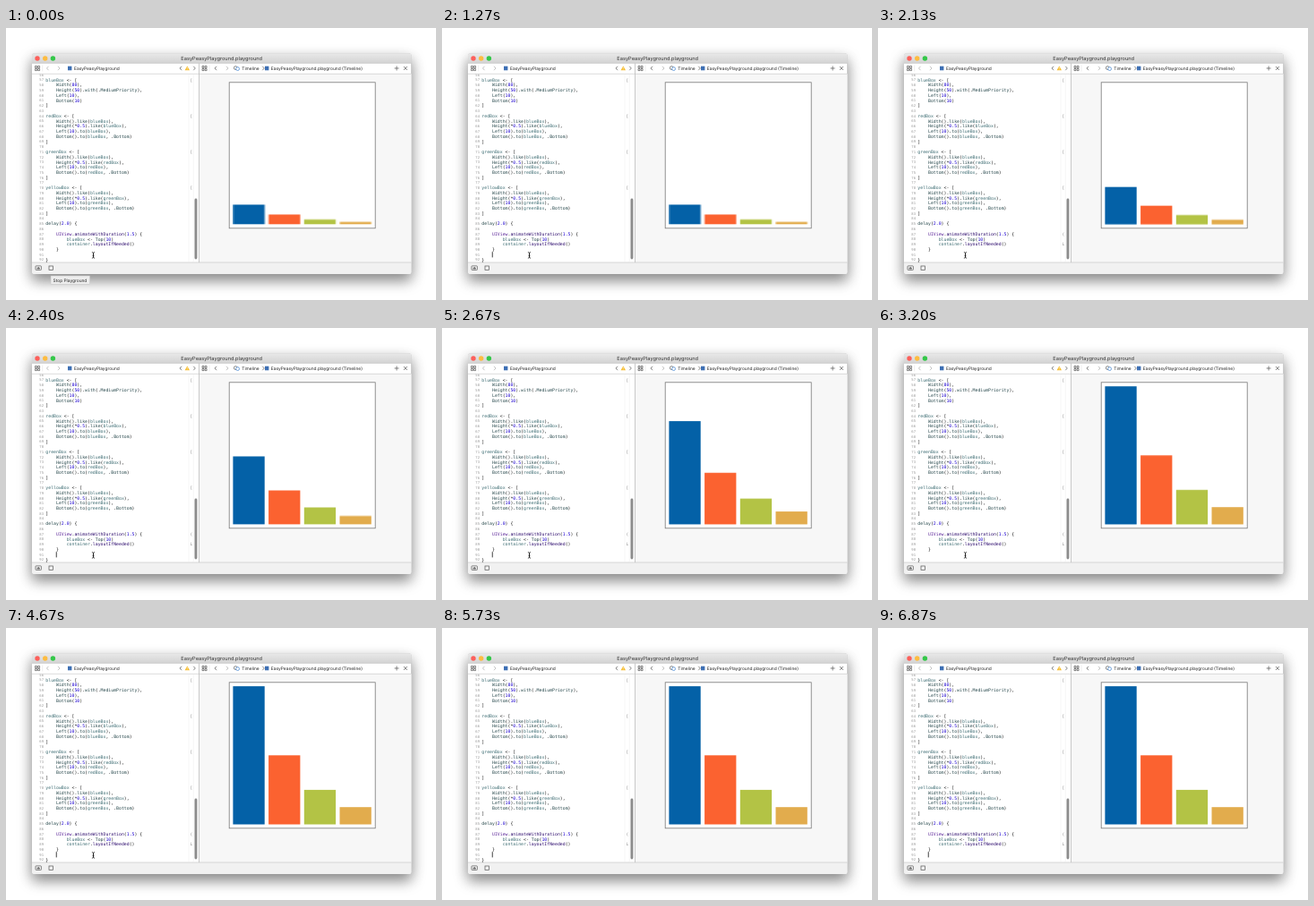
These frames come from a looping animation (480 by 304 pixels, 6940 ms). An HTML page:

```html
<!DOCTYPE html>
<html lang="en">
<head>
<meta charset="utf-8">
<title>Playground</title>
<style>
html, body { margin: 0; width: 100%; height: 100%; overflow: hidden; background: #fff; }
svg { display: block; width: 480px; height: 304px; }
text { font-family: Inter, "Open Sans", sans-serif; font-size: 4.85px; fill: #222; text-rendering: geometricPrecision; white-space: pre; }
.title { font-size: 5.65px; fill: #333; text-anchor: middle; }
.code text, .marks text { font-family: "DejaVu Sans Mono", monospace; fill: #111; }
.code .line { font-size: 3.9px; fill: #999; text-anchor: end; }
.code .num { fill: #1c00cf; }
.code .name { fill: #3f6e74; }
.code .call { fill: #26474b; }
.code .type { fill: #5c2699; }
.code .sys { fill: #2e0d6e; }
.marks text { fill: #888; font-size: 4.6px; }
.shadow { filter: drop-shadow(0 7px 8px rgba(0, 0, 0, .36)) drop-shadow(0 0 .6px rgba(0, 0, 0, .5)); }
.icon { fill: none; stroke: #555; stroke-width: .7; }
.dim { stroke: #aaa; }

.caret, .late, .tip, .bars, .mouse, .beam, .arrow { animation: 6940ms infinite; }
.caret { animation-name: blink; animation-timing-function: step-end; }
.late { animation-name: appear; animation-timing-function: step-end; }
.tip { animation-name: fade; animation-timing-function: linear; }
.bars { animation-name: grow; transform-origin: 0 219.5px; }
.mouse { animation-name: leave; }
.beam { animation-name: beam; animation-timing-function: step-end; }
.arrow { animation-name: arrow; animation-timing-function: step-end; }

@keyframes blink {
  0%, 10.37%, 25.79%, 42.15%, 58.43%, 74.78%, 91.14% { opacity: 0; }
  2.74%, 18.16%, 33.5%, 50.72%, 67.15%, 82.42%, 98.85%, 100% { opacity: 1; }
}
@keyframes appear { 0% { opacity: 0; } 24.86%, 100% { opacity: 1; } }
@keyframes fade { 0% { opacity: 1; } 2.85%, 100% { opacity: 0; } }
@keyframes grow {
  0%, 24.94% { transform: scaleY(.1428); animation-timing-function: cubic-bezier(.42, 0, .58, 1); }
  46.56%, 100% { transform: scaleY(1); }
}
@keyframes leave {
  0%, 70.5% { transform: none; animation-timing-function: ease-in; }
  76.73%, 100% { transform: translate(4px, 34px); }
}
@keyframes beam { 0% { opacity: 1; } 73.4%, 100% { opacity: 0; } }
@keyframes arrow { 0% { opacity: 0; } 73.4% { opacity: 1; } 76.73%, 100% { opacity: 0; } }
</style>
</head>
<body>
<svg viewBox="0 0 480 304">
  <defs>
    <linearGradient id="bar" x2="0" y2="1">
      <stop stop-color="#e9e9e9"/><stop offset="1" stop-color="#d3d3d3"/>
    </linearGradient>
    <clipPath id="frame"><rect x="29" y="28.5" width="423.5" height="246.5" rx="2.5"/></clipPath>
    <clipPath id="editor"><rect x="29" y="51.5" width="186" height="210.5"/></clipPath>
    <g id="grid" class="icon"><path d="M-2.5-2.5h2v2h-2zM.6-2.5h2v2h-2zM-2.5.6h2v2h-2zM.6.6h2v2h-2z"/></g>
    <path id="prev" d="M1-2.2L-1 0L1 2.2"/>
    <path id="next" d="M-1-2.2L1 0L-1 2.2"/>
  </defs>

  <rect class="shadow" x="29" y="28.5" width="423.5" height="246.5" rx="2.5" fill="#fff"/>
  <g clip-path="url(#frame)">
    <rect x="29" y="28" width="424" height="11.5" fill="url(#bar)"/>
    <rect x="216" y="51" width="237" height="211" fill="#f7f7f7"/>
    <rect x="29" y="262" width="424" height="13" fill="#f1f1f1"/>
    <path d="M29 39.3H453M29 51.3H453M29 262H453" stroke="#c2c2c2" stroke-width=".6"/>
    <path d="M215.5 39.5V262" stroke="#bbb" stroke-width=".8"/>
    <path d="M204 51.5V262M209.3 51.5V262" stroke="#ededed" stroke-width=".5"/>
  </g>

  <circle cx="35" cy="34" r="2.7" fill="#fc605b"/>
  <circle cx="43.7" cy="34" r="2.7" fill="#fdbc40"/>
  <circle cx="52.4" cy="34" r="2.7" fill="#34c749"/>
  <text class="title" x="240.7" y="36.1">EasyPeasyPlayground.playground</text>

  <use href="#grid" x="35" y="45"/>
  <path d="M40.7 41.5v7M227 41.5v7" stroke="#ddd" stroke-width=".5"/>
  <g class="icon dim">
    <use href="#prev" x="46.5" y="45"/><use href="#next" x="59" y="45"/>
    <use href="#next" x="247" y="45"/>
  </g>
  <rect x="69" y="42.7" width="4.4" height="4.6" fill="#3d6fb4"/>
  <text x="76" y="46.8">EasyPeasyPlayground</text>
  <g class="icon">
    <use href="#prev" x="195" y="45"/><use href="#next" x="210.3" y="45"/>
    <use href="#prev" x="234" y="45"/><use href="#next" x="287.3" y="45"/>
    <path d="M433.6 45h5M436.1 42.5v5M443.9 43l4 4M447.9 43l-4 4"/>
  </g>
  <path d="M202.3 42.4l2.7 4.9h-5.4z" fill="#f6bd2e"/>
  <path d="M202.3 44v1.6M202.3 46.2v.5" stroke="#fff" stroke-width=".6"/>
  <use href="#grid" x="221.5" y="45"/>
  <g class="icon" stroke-width=".6"><circle cx="256.3" cy="44.6" r="1.9"/><circle cx="258.6" cy="45.6" r="1.9" fill="#fff" style="stroke:#3d82d0"/></g>
  <text x="263.3" y="46.8">Timeline</text>
  <rect x="289" y="42.7" width="4.4" height="4.6" fill="#3d6fb4"/>
  <text x="295.8" y="46.8">EasyPeasyPlayground.playground (Timeline)</text>

  <g class="code" id="code" clip-path="url(#editor)"></g>
  <g class="marks">
    <g id="marks"></g>
    <g class="late"><text x="205.4" y="232">(</text><text x="205.4" y="243.3">L</text></g>
  </g>
  <rect x="210.5" y="190.5" width="2.9" height="68" rx="1.45" fill="#8c8c8c"/>
  <rect class="caret" x="55.8" y="250.2" width=".8" height="6.2" fill="#111"/>

  <rect x="249.2" y="60.8" width="163" height="163" fill="#fff" stroke="#777" stroke-width=".8"/>
  <g class="bars" id="bars"></g>

  <g class="icon">
    <rect x="33" y="265.9" width="6.4" height="4.6" rx=".7"/><path d="M34.6 269l1.6-1.6l1.6 1.6z" fill="#555"/>
    <rect x="48" y="266" width="4.6" height="4.6"/>
  </g>

  <g class="tip">
    <rect x="50" y="277" width="43.6" height="9.4" fill="#ededed" stroke="#c4c4c4" stroke-width=".5"/>
    <text x="52.6" y="283.5">Stop Playground</text>
  </g>

  <g class="mouse">
    <path class="beam" d="M95.9 250.6q1.6 0 1.6 1v4.6q0 1-1.6 1M99.1 250.6q-1.6 0-1.6 1v4.6q0 1 1.6 1M96.6 254.4h1.8" fill="none" stroke="#111" stroke-width=".7"/>
    <path class="arrow" d="M97 252v7l1.6-1.5l1.1 2.5l1.1-.5l-1.1-2.4h2.3z" fill="#111" stroke="#fff" stroke-width=".5"/>
  </g>
</svg>

<script>
const NS = "http://www.w3.org/2000/svg";
const FRAME = 1000 / 15, LOOP = 6940;

function add(parent, tag, attrs, text = "") {
  const el = document.createElementNS(NS, tag);
  for (const key in attrs) el.setAttribute(key, attrs[key]);
  el.textContent = text;
  return parent.appendChild(el);
}

const box = (name, body) => [`${name} <- [`, ...body.map(s => "    " + s), "]", ""];
const follow = (name, other) => box(name, [
  `Width().like(${other === "blueBox" || name === "yellowBox" || name === "greenBox" ? "blueBox" : other}),`,
  `Height(*0.5).like(${other}),`,
  `Left(10).to(${other}),`,
  `Bottom().to(${other}, .Bottom)`
]);
const lines = [
  "",
  ...box("blueBox", ["Width(80),", "Height(50).with(.MediumPriority),", "Left(10),", "Bottom(10)"]),
  ...follow("redBox", "blueBox"),
  ...follow("greenBox", "redBox"),
  ...follow("yellowBox", "greenBox"),
  "delay(2.0) {",
  "",
  "    UIView.animateWithDuration(1.5) {",
  "        blueBox <- Top(10)",
  "        container.layoutIfNeeded()",
  "    }",
  "",
  "}"
];

function tokenClass(s) {
  if (/^\d/.test(s)) return "num";
  if (s === "UIView") return "type";
  if (/^(animate|layout)/.test(s)) return "sys";
  if (/Box$|^container$/.test(s)) return "name";
  return /^\w/.test(s) ? "call" : "";
}

const code = document.getElementById("code");
lines.forEach((line, i) => {
  const y = 53.95 + i * 5.74;
  add(code, "text", { class: "line", x: 42, y: y - .2 }, 56 + i);
  const row = add(code, "text", { x: 44.3 + line.search(/\S|$/) * 2.92, y });
  for (const s of line.trim().match(/\d+(\.\d+)?|\w+|\W+/g) || [])
    add(row, "tspan", { class: tokenClass(s) }, s);
});

const marks = document.getElementById("marks");
for (let i = 0; i < 4; i++) add(marks, "text", { x: 205.4, y: 59.7 + i * 40.18 }, "[");

const bars = document.getElementById("bars");
["#0461a7", "#fb6230", "#b3c345", "#e2ac4d"].forEach((fill, i) => {
  const height = 154.4 / 2 ** i;
  add(bars, "rect", { x: 253.4 + i * 39.7, y: 219.5 - height, width: 35.3, height, fill });
});

// Hold every animation on a 15 fps clock.
const anims = document.getAnimations();
anims.forEach(a => a.pause());
const start = performance.now();
function tick() {
  const t = Math.max(0, performance.now() - start) % LOOP;
  const held = Math.floor((t + 3.4) / FRAME) * FRAME;
  anims.forEach(a => { a.currentTime = Math.min(held, LOOP - 1); });
  requestAnimationFrame(tick);
}
tick();
</script>
</body>
</html>
```
